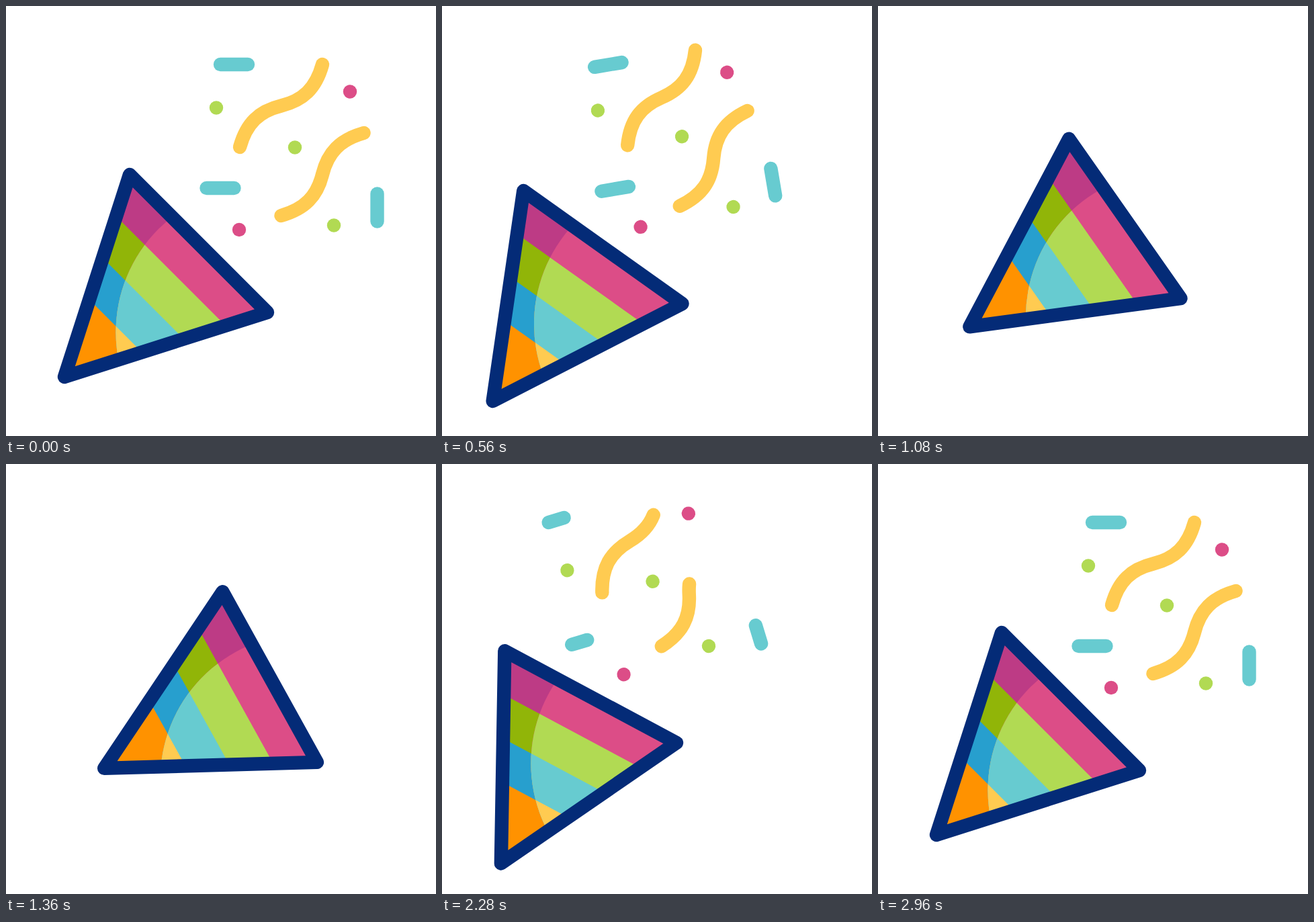
These frames come from a looping animation (640x640 px, 3 s). An HTML page:

```html
<!DOCTYPE html>
<html lang="en">
<head>
<meta charset="utf-8">
<title>Party popper</title>
<style>
  html, body { margin: 0; width: 100%; height: 100%; overflow: hidden; background: #fff; }
  svg { display: block; width: 100vw; height: 100vh; }
  .line { fill: none; stroke-width: 20.4; stroke-linecap: round; }
</style>
</head>
<body>
<svg viewBox="0 0 640 640">
  <defs>
    <clipPath id="cone"><path d="M184 251L389 456L87 552Z"/></clipPath>
    <clipPath id="lit"><circle cx="380.5" cy="485.3" r="217"/></clipPath>
  </defs>
  <g id="popper">
    <g id="confetti"></g>
    <g clip-path="url(#cone)">
      <g id="dark"></g>
      <g id="light" clip-path="url(#lit)"></g>
    </g>
    <path d="M184 251L389 456L87 552Z" fill="none" stroke="#042b77" stroke-width="20.4" stroke-linejoin="round"/>
  </g>
</svg>
<script>
const LOOP = 3000, STEP = 40;
const PIVOT = [168, 486];
const OUT = 640, GONE = 980, MOUTH = 2040, BURST = 2120;
const PINK = '#dc4d87', GREEN = '#b1da53', TEAL = '#67cbd0', YELLOW = '#ffcb51';

const byId = id => document.getElementById(id);
const clamp = x => Math.min(1, Math.max(0, x));
const smooth = x => x * x * (3 - 2 * x);
const span = (t, a, b) => clamp((t - a) / (b - a));

function add(parent, tag, attrs) {
  const el = document.createElementNS('http://www.w3.org/2000/svg', tag);
  for (const k in attrs) el.setAttribute(k, attrs[k]);
  return parent.appendChild(el);
}

// Keys are [time, value, pull]; pull above 1 front-loads the ease.
function track(keys, t) {
  for (let i = 1; i < keys.length; i++) {
    const [t0, v0] = keys[i - 1], [t1, v1, pull = 1] = keys[i];
    if (t <= t1) return v0 + (v1 - v0) * smooth(1 - (1 - span(t, t0, t1)) ** pull);
  }
  return keys[keys.length - 1][1];
}

const turn = [[0, 0], [640, -10], [815, -10], [1200, 16], [2000, 16], [2300, -17.3], [2960, 0, 1.4]];
const push = [[0, 0], [640, -24.5], [800, -24.5], [1180, 77], [1540, 73.7, 2], [1685, 73.7],
  [2010, -4], [2310, -22.3], [2960, 0, 1.4]];

function stripes(group, colors) {
  colors.forEach((fill, i) => {
    const c = 149 + 82 * (i - 1);
    const d = i ? `M0 ${c}L640 ${c + 640}H0Z` : 'M0 0H640V640H0Z';
    add(group, 'path', { d, fill });
  });
}
stripes(byId('dark'), ['#bd3b85', '#91b508', '#279fce', '#ff9200']);
stripes(byId('light'), [PINK, GREEN, TEAL, YELLOW]);

const confetti = byId('confetti');

// Dots: rest place, drift on leaving, time of arrival.
const dots = [
  [512, 127.5, 33, -34.5, PINK, 2369],
  [313, 151.5, 49, 3, GREEN, 2397],
  [430, 210.5, 32.6, -33, GREEN, 2369],
  [488, 326.5, 8, -54, GREEN, 2397],
  [347, 333, 21.6, -26, PINK, 2369]
].map(([x, y, dx, dy, fill, end]) =>
  ({ x, y, dx, dy, end, el: add(confetti, 'circle', { r: 10.2, fill }) }));

// Pills slide along their own axis: tail point, direction, reach, lag, arrival.
const pills = [
  { x: 319, y: 87, ux: 1, uy: 0, reach: 41, lag: [41, 82], end: 2480 },
  { x: 298.5, y: 271, ux: 1, uy: 0, reach: 35, lag: [39, 80], end: 2480 },
  { x: 552.5, y: 320.5, ux: 0, uy: -1, reach: 41, lag: [57, 80], end: 2600 }
];
for (const p of pills) p.el = add(confetti, 'line', { class: 'line', stroke: TEAL });

const worms = [
  { d: 'M348 210C358 174 377 156.5 409.5 148.5S461 123 471 87', dx: 42, dy: -31, end: 2367, off: 970 },
  { d: 'M409.5 312C445 302 463 283 471 250.5S497 199 532.5 189', dx: 40, dy: -57, end: 2480, off: 945 }
];
for (const w of worms) {
  w.el = add(confetti, 'path', { class: 'line', d: w.d, stroke: YELLOW });
  w.len = w.el.getTotalLength();
}

const show = (el, on) => el.setAttribute('visibility', on ? 'visible' : 'hidden');
const left = (t, end) => (1 - span(t, BURST, end)) ** 1.5;

function draw(t) {
  const s = track(push, t);
  byId('popper').setAttribute('transform',
    `translate(${s} ${-s}) rotate(${track(turn, t)} ${PIVOT})`);

  const leave = t < 1500 ? span(t, OUT, GONE) : 0;
  const drift = smooth(leave) / 0.79;

  for (const { x, y, dx, dy, end, el } of dots) {
    const back = t > 1500 ? (1 - span(t, MOUTH, end)) ** 3 : 0;
    el.setAttribute('cx', x + (PIVOT[0] - x) * back + dx * drift);
    el.setAttribute('cy', y + (PIVOT[1] - y) * back + dy * drift);
    show(el, t < GONE || t > MOUTH);
  }

  for (const { x, y, ux, uy, reach, lag, end, el } of pills) {
    const back = t > 1500 ? left(t, end) : 0;
    const tail = (reach + 41) * smooth(leave) - lag[0] * back;
    const head = 41 + reach * (1 - (1 - leave) ** 2) - lag[1] * back;
    el.setAttribute('x1', x + ux * tail);
    el.setAttribute('y1', y + uy * tail);
    el.setAttribute('x2', x + ux * head);
    el.setAttribute('y2', y + uy * head);
    show(el, t < GONE || t >= BURST);
  }

  for (const { dx, dy, end, off, len, el } of worms) {
    const from = t < 1500 ? smooth(span(t, OUT, off)) : 0;
    const to = t > 1500 ? 1 - left(t, end) : 1;
    el.setAttribute('stroke-dasharray', `${(to - from) * len} ${len * 2}`);
    el.setAttribute('stroke-dashoffset', -from * len);
    el.setAttribute('transform', `translate(${dx * drift} ${dy * drift})`);
    show(el, t < off || t > BURST);
  }
}

const start = performance.now();
function tick() {
  const t = (performance.now() - start) % LOOP;
  draw(Math.floor(t / STEP) * STEP);
  requestAnimationFrame(tick);
}
tick();
</script>
</body>
</html>
```
